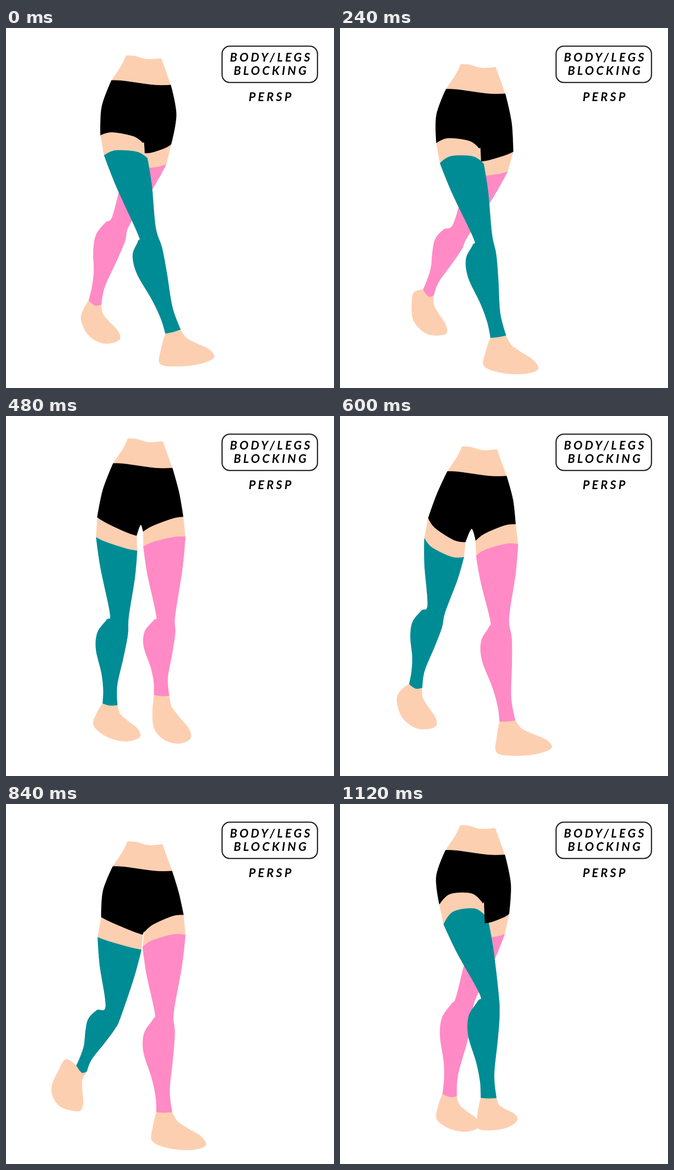
An HTML page that plays this animation: 715 px wide and 783 px high, repeating every 1160 ms.

```html
<!DOCTYPE html>
<html lang="en">
<head>
<meta charset="utf-8">
<title>Walk cycle</title>
<style>
  html, body { margin: 0; width: 100%; height: 100%; overflow: hidden; background: #fff; }
  svg { display: block; }
  text { font: italic 700 26px Lato, "Open Sans", sans-serif; letter-spacing: 5px; text-anchor: middle; }
</style>
</head>
<body>
<svg id="stage" width="715" height="783" viewBox="0 0 715 783">
  <rect x="471" y="39.5" width="208" height="79" rx="17" fill="#fff" stroke="#222" stroke-width="2.6"/>
  <text x="578" y="73">BODY/LEGS</text>
  <text x="578" y="102">BLOCKING</text>
  <text x="578" y="159">PERSP</text>
</svg>
<script>
const CYCLE = 28, STEP = 40, LOOP = 1160;
const SKIN = '#fdcfb1';

// Key poses of each leg as x, y pairs: stocking top left and right, knee, ankle, heel, toe.
const times = [0, 5, 9, 14, 19, 23, 26];
const pinkKeys = [
  [265,305, 349,297, 250,420, 194,597, 164,635, 246,679],
  [285,323, 365,313, 262,441, 193,575, 157,592, 229,666],
  [299,280, 389,262, 336,432, 305,575, 289,640, 346,689],
  [297,304, 388,279, 348,441, 365,663, 342,732, 461,722],
  [298,311, 391,285, 345,453, 345,670, 319,733, 435,743],
  [300,287, 377,276, 307,447, 290,653, 262,711, 367,722],
  [290,292, 359,283, 273,425, 239,633, 211,685, 302,703]
];
const tealKeys = [
  [214,277, 308,283, 307,441, 364,660, 336,730, 453,717],
  [218,294, 313,295, 311,452, 345,671, 314,735, 431,743],
  [207,269, 299,287, 276,445, 274,652, 241,706, 349,716],
  [184,266, 270,307, 210,419, 165,587, 124,619, 207,676],
  [200,290, 295,317, 233,453, 165,575, 116,577, 157,668],
  [207,259, 308,272, 270,433, 204,600, 161,635, 236,714],
  [226,262, 322,249, 325,413, 324,639, 300,704, 385,690]
];

const wrap = n => (n + times.length) % times.length;
const gap = n => (times[wrap(n + 1)] - times[wrap(n)] + CYCLE) % CYCLE;
const clamp = x => Math.min(1, Math.max(0, x));

// Smooth periodic interpolation between key poses, returned as points.
function joints(keys, frame) {
  const n = times.findLastIndex(t => t <= frame);
  const h = gap(n), u = (frame - times[n]) / h, v = 1 - u;
  const flat = keys[n].map((a, i) => {
    const value = k => keys[wrap(k)][i];
    const rate = k => (value(k + 1) - value(k)) / gap(k);
    const slope = k => (rate(k - 1) * gap(k) + rate(k) * gap(k - 1)) / (gap(k) + gap(k - 1));
    return a + (value(n + 1) - a) * u * u * (3 - 2 * u) + h * u * v * (v * slope(n) - u * slope(n + 1));
  });
  return flat.flatMap((x, i) => i % 2 ? [] : [[x, flat[i + 1]]]);
}

const add = (p, x, y) => [p[0] + x, p[1] + y];
const mix = (a, b, t) => add(a, (b[0] - a[0]) * t, (b[1] - a[1]) * t);
const slide = (a, b, t, x) => add(mix(a, b, t), x, 0);

// Point at t between a and b, pushed clockwise from the line.
function along(a, b, t, push) {
  const dx = b[0] - a[0], dy = b[1] - a[1], k = push / Math.hypot(dx, dy);
  return add(mix(a, b, t), -dy * k, dx * k);
}

// A line bowed upwards, drawn from left to right.
const bow = (a, b, rise) => [a, along(a, b, .25, -rise), along(a, b, .75, -rise), b];

// Both ends of a cut across a limb that leans by slope.
function cut(center, slope, width) {
  const k = width / 2 / Math.hypot(1, slope);
  return [add(center, -k, slope * k), add(center, k, -slope * k)];
}

// Closed curve through the points, sharp at the listed corners.
function outline(points, corners) {
  const size = points.length;
  const at = n => points[(n + size) % size];
  const handle = (n, sign) => {
    if (corners.includes(n % size)) return at(n);
    const a = at(n - 1), b = at(n + 1);
    return add(at(n), sign * (b[0] - a[0]) / 6, sign * (b[1] - a[1]) / 6);
  };
  const curves = points.map((p, n) => `C${handle(n, 1)} ${handle(n + 1, -1)} ${at(n + 1)}`);
  return `M${points[0]}${curves.join('')}Z`;
}

function shape(color) {
  const path = document.createElementNS('http://www.w3.org/2000/svg', 'path');
  path.setAttribute('fill', color);
  path.setAttribute('stroke', color);
  path.setAttribute('stroke-width', .8);
  document.getElementById('stage').append(path);
  return (points, corners) => path.setAttribute('d', outline(points, corners));
}

const leg = (keys, color, side, lift) =>
  ({ keys, side, lift, foot: shape(SKIN), thigh: shape(SKIN), stocking: shape(color) });
const pink = leg(pinkKeys, '#ff8ac5', 1, -9);
const teal = leg(tealKeys, '#008c95', -1, 16);
const drawTorso = shape(SKIN), drawShorts = shape('#000');

function measure({ keys, side, lift }, frame) {
  const [topL, topR, knee, ankle, heel, toe] = joints(keys, frame);
  const lean = (ankle[0] - knee[0]) / (ankle[1] - knee[1]);
  const back = clamp(-2.2 * lean);
  const swing = knee[0] - (topL[0] + topR[0]) / 2;
  const outer = p => add(p, -.26 * swing - 4 * side, -44);
  const inner = p => add(p, -.2 * swing, -33);
  return {
    topL, topR, heel, toe, back,
    rise: lift - .66 * (topR[1] - topL[1]),
    knees: cut(knee, 1.5 * lean, 41),
    ankles: cut(ankle, lean, 34 - 8 * back),
    hemL: side < 0 ? outer(topL) : inner(topL),
    hemR: side < 0 ? inner(topR) : outer(topR)
  };
}

function drawLeg(leg, m, waist) {
  const { topL, topR, heel, toe, back } = m;
  const [kneeL, kneeR] = m.knees, [ankleL, ankleR] = m.ankles;
  const top = bow(topL, topR, m.rise);

  const drop = (toe[1] - heel[1]) / Math.hypot(toe[0] - heel[0], toe[1] - heel[1]);
  const sole = -10 - 25 * Math.max(0, drop);
  const tuck = (ankleL[0] - heel[0]) / Math.hypot(ankleL[0] - heel[0], ankleL[1] - heel[1]);
  leg.foot([
    ankleR, along(ankleR, toe, .22, 6), along(ankleR, toe, .48, 1), along(ankleR, toe, .8, -7),
    toe, along(toe, heel, .28, sole), along(toe, heel, .68, sole),
    heel, along(heel, ankleL, .5, -3 - 16 * tuck ** 3), ankleL
  ], [0, 9]);

  leg.thigh([waist, m.hemL, ...top, m.hemR], [0, 1, 2, 5, 6]);

  const shin = (t, x) => slide(kneeR, ankleR, t, x);
  const calf = (t, x) => slide(kneeL, ankleL, t, -x);
  leg.stocking([
    ...top, along(topR, kneeR, .4, -2.5), kneeR,
    shin(.2, 3), shin(.45, 0), shin(.78, -6),
    ankleR, add(mix(ankleL, ankleR, .5), 0, 1 + 8 * back), ankleL,
    calf(.85, 1), calf(.66, 9 - 4 * back), calf(.4, 26 - 8 * back), calf(.21, 24), calf(.07, 4 + 11 * back),
    kneeL, along(kneeL, topL, .6, -2.5)
  ], [0, 3, 9, 11]);
}

function draw(frame) {
  // The hips sway once and bob twice per cycle.
  const turn = 2 * Math.PI / CYCLE, sway = Math.cos(turn * frame);
  const bob = Math.cos(2 * turn * (frame - 3.7));
  const hip = (x, y) => add([x, y], 2 - 2 * sway, y && 4 + 18.5 * bob - 3.3 * sway);
  const waistL = hip(230, 115), waistR = hip(359, 125);

  const p = measure(pink, frame), t = measure(teal, frame);
  p.hemL[0] = Math.max(p.hemL[0], t.hemR[0] + 4);
  drawLeg(pink, p, waistR);
  drawLeg(teal, t, waistL);

  drawTorso([hip(262, 61), hip(281, 62), hip(307, 69), hip(338, 67), waistR, hip(325, 128), waistL, hip(252, 82)],
    [0, 3, 4, 6]);

  const flank = (a, b, full) => along(a, b, .5, Math.sign(full) * (Math.abs(full) - .4 * Math.abs(b[0] - a[0])));
  const split = p.hemL[0] - t.hemR[0] - 4;
  const notch = [mix(t.hemR, p.hemL, .6)[0], Math.min(t.hemR[1], p.hemL[1]) - 1.4 * split];
  drawShorts([
    waistL, flank(waistL, t.hemL, 19), ...bow(t.hemL, t.hemR, .9 * t.rise), notch,
    ...bow(p.hemL, p.hemR, .9 * p.rise), flank(waistR, p.hemR, -12), waistR, hip(322, 125), hip(255, 116)
  ], [0, 2, 5, 7, 10, 12]);
}

const start = performance.now();
function tick() {
  const n = Math.floor((performance.now() - start) % LOOP / STEP);
  draw(n - (n > 1) - (n > 15)); // two poses are held for a double step
  requestAnimationFrame(tick);
}
tick();
</script>
</body>
</html>
```
